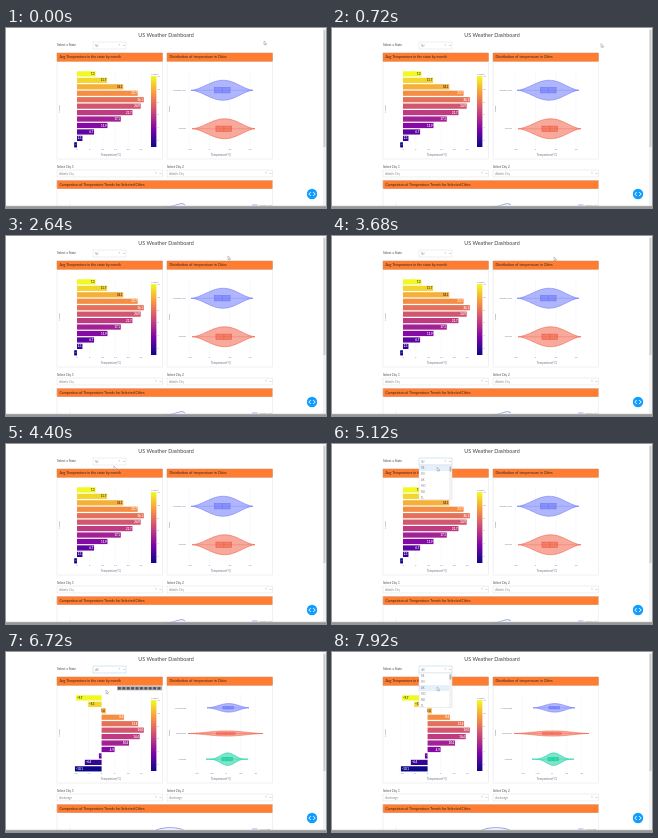
An HTML page with a canvas that plays this animation: 320 px wide and 180 px high, repeating every 8 s.

```html
<!DOCTYPE html>
<html lang="en">
<head>
<meta charset="utf-8">
<title>Weather dashboard</title>
<style>
html, body { margin: 0; width: 100%; height: 100%; overflow: hidden; background: #fff }
canvas { display: block; width: 320px; height: 180px }
</style>
</head>
<body>
<canvas></canvas>
<script>
const LOOP = 8000, OPEN = 4720, PICK = 6000, UPDATE = 6320, REOPEN = 7520;
const canvas = document.querySelector('canvas'), c = canvas.getContext('2d');
const dpr = window.devicePixelRatio || 1;
canvas.width = 320 * dpr;
canvas.height = 180 * dpr;

const PLASMA = ['#0d0887', '#7e03a8', '#cc4778', '#f89540', '#f0f921'];
const CITY_COLORS = ['#636efa', '#ef553b', '#00cc96'];
const ORANGE = '#ff7c30', INK = '#444', AXIS = '#6b7890';
const STATES = ['PA', 'WI', 'AK', 'MO', 'ND', 'FL'];

const VIEWS = [
  {
    climate: { jan: -1.1, peak: 8, high: 26.1, dec: 7.2 },
    months: { zero: 71, unit: 2.56, from: 0, to: 25, step: 5 },
    spread: { zero: 203.5, unit: 1.01, from: -20, to: 40, step: 20 },
    cities: [
      { name: 'Atlantic City', left: 185, right: 247, half: 10, sharp: 1.6 },
      { name: 'Newark', left: 186, right: 249, half: 10, sharp: 1.6 }
    ],
    trend: { x: 159, w: 21, skew: 3 }
  },
  {
    climate: { jan: -10.1, peak: 7, high: 16, dec: -9.7 },
    months: { zero: 95.6, unit: 2.64, from: -10, to: 15, step: 5 },
    spread: { zero: 220, unit: 0.74, from: -40, to: 40, step: 20 },
    cities: [
      { name: 'Anchorage', left: 201, right: 243, half: 4.3, sharp: 1.8 },
      { name: 'Fairbanks', left: 182, right: 257, half: 2.6, sharp: 1.7 },
      { name: 'Juneau', left: 200, right: 242, half: 6.3, sharp: 3.5 }
    ],
    trend: { x: 149, w: 30, skew: 1 }
  }
];

// time, x, y
const PATH = [[0, 258, 13], [1600, 284, 19], [1840, 284, 19], [2640, 222, 20], [3840, 222, 21],
  [4400, 108, 22], [4880, 107, 18], [5600, 100, 38], [6880, 100, 38], [7440, 108, 18], [LOOP, 105, 36]];

const smooth = k => k * k * (3 - 2 * k);
const lerp = (a, b, k) => a + (b - a) * k;

function pointer(t) {
  const i = PATH.findIndex(p => p[0] > t);
  const [t0, x0, y0] = PATH[i - 1], [t1, x1, y1] = PATH[i];
  const k = smooth((t - t0) / (t1 - t0));
  return [lerp(x0, x1, k), lerp(y0, y1, k)];
}

// Temperature falls away from the warmest month towards both ends of the year.
function temperature({ jan, peak, high, dec }, month) {
  const k = month < peak ? (peak - month) / (peak - 1) : (month - peak) / (12 - peak);
  return lerp(high, month < peak ? jan : dec, k * k * (2.4 - 1.4 * k));
}

function plasma(k) {
  const p = k * (PLASMA.length - 1), i = Math.min(Math.floor(p), PLASMA.length - 2);
  const part = (s, j) => parseInt(s.slice(j, j + 2), 16);
  return `rgb(${[1, 3, 5].map(j => Math.round(lerp(part(PLASMA[i], j), part(PLASMA[i + 1], j), p - i)))})`;
}

function rect(x, y, w, h, fill) {
  c.fillStyle = fill;
  c.fillRect(x, y, w, h);
}

function frame(x, y, w, h, stroke, width = 0.5) {
  c.strokeStyle = stroke;
  c.lineWidth = width;
  c.strokeRect(x, y, w, h);
}

function text(s, x, y, size, color = INK, align = 'left', weight = 400) {
  c.font = `${weight} ${size}px Lato, "Open Sans", sans-serif`;
  c.fillStyle = color;
  c.textAlign = align;
  c.textBaseline = 'middle';
  c.fillText(s, x, y);
}

function vertical(s, x, y) {
  c.save();
  c.translate(x, y);
  c.rotate(-Math.PI / 2);
  text(s, 0, 0, 2.6, AXIS, 'center');
  c.restore();
}

function line(points, color, width = 0.5) {
  c.beginPath();
  points.forEach(p => c.lineTo(...p));
  c.strokeStyle = color;
  c.lineWidth = width;
  c.stroke();
}

function shape(points, fill, stroke, width) {
  c.beginPath();
  points.forEach(p => c.lineTo(...p));
  c.closePath();
  c.fillStyle = fill;
  c.fill();
  c.strokeStyle = stroke;
  c.lineWidth = width;
  c.stroke();
}

function header(s, x, w, y) {
  rect(x, y, w, 8.4, ORANGE);
  frame(x, y, w, 8.4, '#c98058', 0.4);
  text(s, x + 2.5, y + 4.3, 3.6, '#33271f');
}

function select(value, x, y, w, focused) {
  rect(x, y, w, 7, '#fff');
  frame(x, y, w, 7, focused ? '#a9cdea' : '#ddd');
  text(value, x + 2.2, y + 3.7, 2.7, '#888');
  text('×', x + w - 6.5, y + 3.5, 3.2, '#aaa', 'center');
  line([[x + w - 3, y + 3], [x + w - 2, y + 4], [x + w - 1, y + 3]], '#aaa');
}

const signed = s => String(s).replace('-', '−');

function axis({ zero, unit, from, to, step }, label, x) {
  for (let v = from; v <= to; v += step) {
    const tick = zero + v * unit;
    line([[tick, 42], [tick, 119.5]], '#f1f3f7', 0.4);
    text(signed(v), tick, 121.7, 2.5, AXIS, 'center');
  }
  text('Temperature(°C)', x + 54, 126.7, 2.8, AXIS, 'center');
  vertical(label, x + 2, 81);
}

function monthChart({ climate, months: { zero, unit } }) {
  for (let m = 1; m <= 12; m++) {
    const v = temperature(climate, m), end = zero + v * unit, y = 43.3 + (12 - m) * 6.45;
    rect(Math.min(zero, end), y, Math.abs(end - zero), 5.2, plasma((m - 1) / 11));
    text(signed(v.toFixed(1)), end + (v < 0 ? 0.8 : -0.8), y + 2.8, 2.8,
      m > 9 ? '#333' : '#fff', v < 0 ? 'left' : 'right', 700);
  }
  for (let y = 0; y < 71; y++) rect(145, 118 - y, 5.4, 1, plasma(y / 70));
  text('Month', 145, 45.8, 2.6, AXIS);
  for (let m = 2; m <= 12; m += 2) text(m, 151.2, 119 - (m - 1) / 11 * 71, 2.4, AXIS);
}

function violin({ name, left, right, half, sharp }, i, { length }) {
  const y = 43 + 77 * (i + 0.5) / length, color = CITY_COLORS[i], outline = [];
  for (let a = 0; a < 100; a++) {
    const u = a < 50 ? a / 50 : 2 - a / 50, side = a < 50 ? -1 : 1;
    outline.push([lerp(left, right, u), y + side * half * Math.abs(Math.sin(Math.PI * u ** 1.05)) ** sharp]);
  }
  shape(outline, color + '80', color, 0.5);
  const q1 = lerp(left, right, 0.38), q3 = lerp(left, right, 0.63), mid = (q1 + q3) / 2;
  const h = half * 0.27;
  rect(q1, y - h, q3 - q1, 2 * h, color + '80');
  frame(q1, y - h, q3 - q1, 2 * h, color);
  line([[mid, y - h], [mid, y + h]], color);
  line([[left, y], [right, y]], color, 0.3);
  text(name, 180, y, 2.4, AXIS, 'right');
}

function trendChart({ cities, trend: { x, w, skew } }) {
  line([[64, 173], [64, 178]], '#dde3ec', 0.4);
  const curve = [];
  for (let u = 0; u <= 1; u += 0.05) curve.push([x + w * u, 179 - 3.3 * Math.sin(Math.PI * u ** skew) ** 0.6]);
  line(curve, CITY_COLORS[0], 0.7);
  line([[246, 177], [251.5, 177]], CITY_COLORS[0], 0.6);
  text(cities[0].name, 253, 177, 2.4, AXIS);
}

function modebar() {
  rect(111, 34.3, 45, 4, '#a5a8ad');
  for (let x = 112; x < 155; x += 4.4) rect(x, 35.1, 2.8, 2.4, '#4f5358');
}

function menu(py) {
  rect(87, 21, 33, 34.5, '#fff');
  const row = Math.floor((py - 21) / 6);
  if (row >= 0) rect(87, 21 + row * 6, 30, 6, '#e4f0fb');
  STATES.forEach((s, i) => text(s, 89, 24.2 + i * 5.9, 2.7, '#888'));
  rect(117, 21, 3, 34.5, '#f3f3f3');
  rect(117.5, 22.5, 2, 5, '#b5b5b5');
  frame(87, 21, 33, 34.5, '#ddd');
}

function cursor(x, y) {
  const arrow = [[0, 0], [0, 3.8], [0.9, 3], [1.5, 4.2], [2.1, 3.9], [1.6, 2.8], [2.7, 2.7]];
  shape(arrow.map(([dx, dy]) => [x + dx, y + dy]), '#fff', '#777', 0.4);
}

function browserEdges() {
  c.beginPath();
  c.arc(306, 166, 5.2, 0, 7);
  c.fillStyle = '#119dff';
  c.fill();
  for (const s of [-1, 1]) line([[306 + s * 1.2, 164], [306 + s * 3.2, 166], [306 + s * 1.2, 168]], '#fff', 0.9);
  rect(317, 0, 3, 178, '#f1f1f1');
  rect(317.5, 2, 2, 117, '#cbcbcb');
  rect(0, 177.6, 320, 0.8, '#d0d0d0');
  rect(0, 178.2, 320, 1.8, '#969696');
}

function draw(t) {
  const view = VIEWS[t < UPDATE ? 0 : 1];
  const open = t >= OPEN && t < PICK || t >= REOPEN;
  const [px, py] = pointer(t);
  c.setTransform(dpr, 0, 0, dpr, 0, 0);
  rect(0, 0, 320, 180, '#fff');
  text('US Weather Dashboard', 160, 7.2, 5.35, INK, 'center');
  text('Select a State', 51, 16.8, 3.2);
  select(t < PICK ? 'NJ' : 'AK', 87, 14, 33, t >= OPEN);

  for (const x of [51, 161]) frame(x, 25, 105.5, 106, '#ddd', 0.4);
  header('Avg Temperature in the state by month', 51, 105.5, 25);
  header('Distribution of temperature in Cities', 161, 105.5, 25);
  axis(view.months, 'Month', 51);
  monthChart(view);
  axis(view.spread, 'Cities', 161);
  view.cities.forEach(violin);

  [51, 161].forEach((x, i) => {
    text(`Select City ${i + 1}`, x, 139.5, 3);
    select(view.cities[0].name, x, 142, 105.5);
  });
  header('Comparison of Temperature Trends for Selected Cities', 51, 215.5, 152.3);
  frame(51, 152.3, 215.5, 30, '#ddd', 0.4);
  trendChart(view);

  if (!open && px < 156 && py > 34) modebar();
  if (open) menu(py);
  browserEdges();
  cursor(px, py);
}

function tick() {
  draw(performance.now() % LOOP);
  requestAnimationFrame(tick);
}
tick();
</script>
</body>
</html>
```
